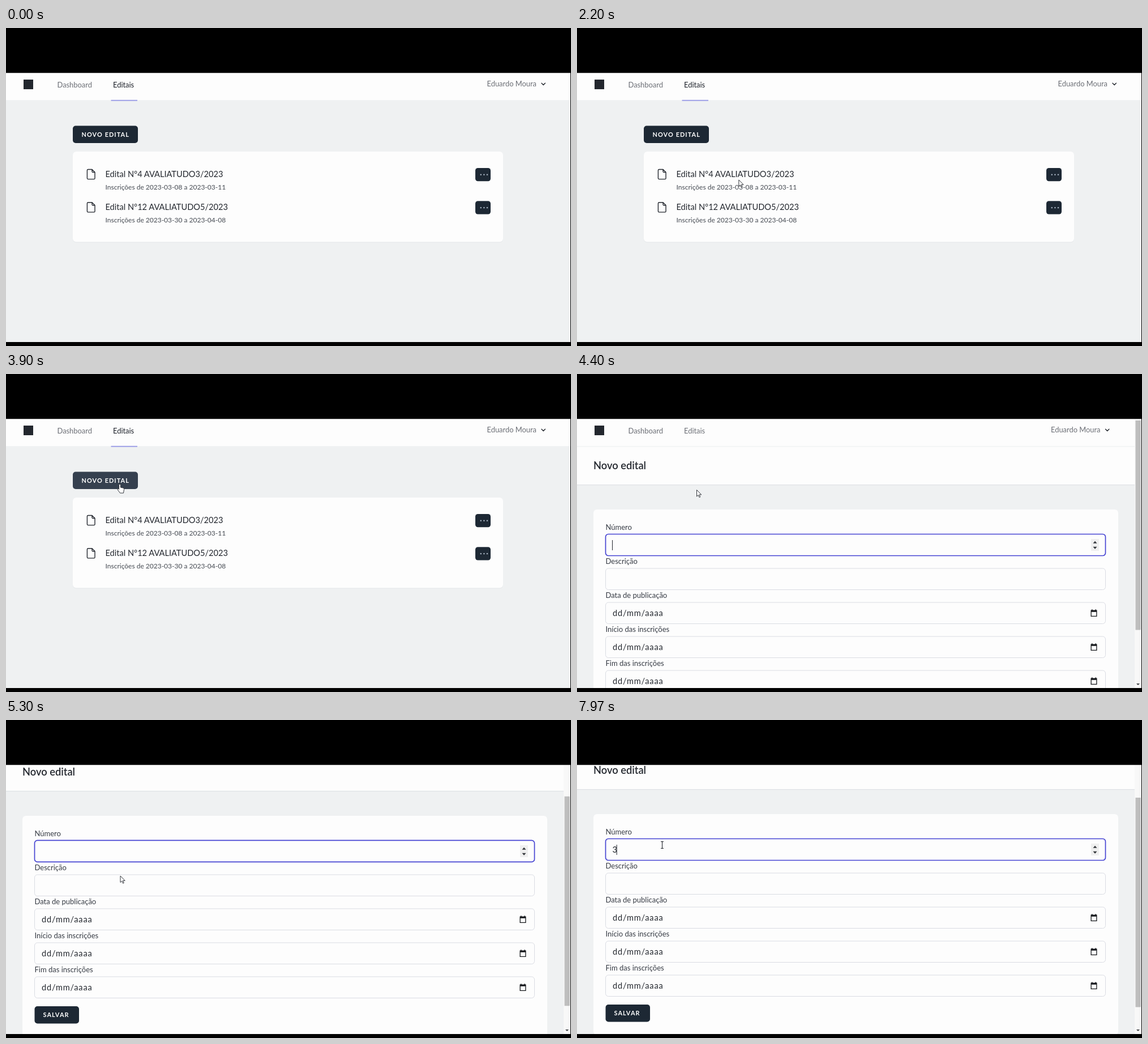
Write an HTML page that moves like this. It is 998x561 px and loops after 8 s.

```html
<!DOCTYPE html>
<html lang="pt-BR">
<head>
<meta charset="utf-8">
<title>Editais</title>
<style>
  html, body { margin: 0; width: 100%; height: 100%; overflow: hidden; background: #000; }
  svg { display: block; width: 100vw; height: 100vh; }
  text { font-family: Lato, "Open Sans", sans-serif; fill: #23272e; white-space: pre; }
  .nav { font-size: 12.9px; fill: #6c6f76; }
  .on { fill: #1c2029; }
  .title { font-size: 14.6px; }
  .sub { font-size: 12px; fill: #454a52; }
  .label { font-size: 13px; fill: #363b44; }
  .date { font-size: 14.5px; letter-spacing: .85px; }
  .value { font-size: 14.5px; }
  .head { font-size: 18.3px; font-weight: 600; }
  .btn { font-size: 10.9px; font-weight: 700; letter-spacing: 1.09px; fill: #fff; }
  .line { fill: none; stroke: #23272e; stroke-width: 1.4; stroke-linejoin: round; stroke-linecap: round; }
  .pointer { fill: #fff; stroke: #33363c; stroke-width: 1; stroke-linejoin: round; }
</style>
</head>
<body>
<svg id="stage" viewBox="0 0 998 561" preserveAspectRatio="none"></svg>
<script>
const LOOP = 8000;
const LOAD = 4300;
const BLINK_START = 4320;
const BLINK = 530;
const TYPED = 7770;
const DARK = '#1d2834';
const PAPER = '#fdfdfd';

const rect = (x, y, w, h, fill, r = 0, more = '') =>
  `<rect x="${x}" y="${y}" width="${w}" height="${h}" rx="${r}" fill="${fill}" ${more}/>`;
const text = (x, y, cls, str) => `<text x="${x}" y="${y}" class="${cls}">${str}</text>`;
const group = (id, body) => `<g id="${id}">${body}</g>`;

function card(x, y, w, h) {
  return rect(x, y + 1, w, h, '#e3e6e9', 6) + rect(x, y, w, h, PAPER, 6);
}

function navBar(right, active) {
  return rect(0, 70, right, 57.5, PAPER) +
    rect(0, 127.5, right, 1, '#f0f1f3') +
    rect(31, 91, 17, 17, '#23272e') +
    text(90.5, 104.5, 'nav', 'Dashboard') +
    text(189, 104.5, active ? 'nav on' : 'nav', 'Editais') +
    (active ? rect(185.5, 126.8, 46.5, 1.9, '#9a9ce6') : '');
}

function account(dx) {
  return `<g transform="translate(${dx} 0)">` +
    text(849.5, 103.2, 'nav', 'Eduardo Moura') +
    '<path class="line" d="M946 97.3l3.2 3.2 3.2-3.2"/></g>';
}

function listRow(y, title, period) {
  const dots = [838.8, 844.4, 850].map(x => `<circle cx="${x}" cy="${y + 11.7}" r="1.3" fill="#a3afbd"/>`);
  return `<path class="line" d="M145 ${y + 2.5}h7l5 5v10.5q0 1.6-1.6 1.6h-10.4q-1.6 0-1.6-1.6v-13.900q0-1.600 1.600-1.600zM152 ${y + 2.5}v3.400q0 1.600 1.600 1.600h3.400"/>` +
    text(175.5, y + 16, 'title', title) +
    text(175.5, y + 38, 'sub', period) +
    rect(829, y, 27, 23.3, DARK, 4.5) + dots.join('');
}

function listPage() {
  return rect(0, 79, 997, 476, '#eff1f2') +
    navBar(997, true) + account(0) +
    rect(118, 172.5, 115, 30.5, DARK, 5, 'id="newBtn"') +
    text(133.5, 191.6, 'btn', 'NOVO EDITAL') +
    card(118, 218, 760, 159.5) +
    listRow(247, 'Edital N°4 AVALIATUDO3/2023', 'Inscrições de 2023-03-08 a 2023-03-11') +
    listRow(305.3, 'Edital N°12 AVALIATUDO5/2023', 'Inscrições de 2023-03-30 a 2023-04-08');
}

function numberField() {
  return rect(50.5, 282.5, 883, 38, PAPER, 5, 'stroke="#4543d2" stroke-width="1.7"') +
    rect(908, 291, 14, 21, '#efefef') +
    '<path fill="#33363b" d="M911.500 298.700h7l-3.500-4zM911.500 304.700h7l-3.500 4z"/>';
}

function plainField(y) {
  return rect(50.5, y, 883, 37.5, PAPER, 5, 'stroke="#dadce3"');
}

function dateField(y) {
  return plainField(y) + text(63, y + 24, 'date', 'dd/mm/aaaa') +
    `<path fill="#16181c" fill-rule="evenodd" d="M907.500 ${y + 13.5}h1.500v-1.300h1.500v1.300h5v-1.300h1.500v1.300h1.500v11.500h-11zM908.800 ${y + 16.8}v7h8.400v-7z"/>`;
}

function formPage() {
  const labels = ['Número', 'Descrição', 'Data de publicação', 'Início das inscrições', 'Fim das inscrições'];
  const fields = labels.map((label, i) => {
    const y = 283 + 60 * i;
    const field = i === 0 ? numberField() : i === 1 ? plainField(y) : dateField(y);
    return text(50.5, y - 8, 'label', label) + field;
  });
  const content = navBar(985, false) + account(-12.5) +
    rect(0, 128.5, 985, 66.5, PAPER) + rect(0, 195, 985, 1.2, '#dfe2e5') +
    text(29, 168, 'head', 'Novo edital') +
    card(29, 239, 927, 390) + fields.join('') +
    rect(50.5, 575, 78.5, 30.5, DARK, 5) + text(65.5, 594.2, 'btn', 'SALVAR') +
    `<g id="digit">${text(62.5, 307, 'value', '3')}</g>` +
    rect(62, 293, 1, 18, '#23272e', 0, 'id="caret"');
  return rect(0, 79, 997, 476, '#eff1f2') + group('content', content) +
    rect(985, 79, 12, 476, '#f8f8f8') +
    rect(986.5, 82, 9.5, 369.5, '#bebebe', 0, 'id="thumb"') +
    '<path fill="#3c3e42" d="M988 546h6l-3 3z"/>';
}

function pointers() {
  return group('arrow', '<path class="pointer" d="M.500 .500v11.500l2.700-2.400 1.900 4.100 1.700-.8-1.900-4h3.800z"/>') +
    group('hand', '<path class="pointer" d="M-1.500 1.200Q0-.8 1.300 1.200V6l4.700 1q1.800.3 1.500 2.500l-1 6.500H.5L-4 9.800Q-4.200 8-2.500 8.500l1 1z"/>') +
    group('beam', '<path class="line" style="stroke-width:1.100" d="M-2-6h1.500l.5.500.5-.5H2M0-5.500v11M-2 6h1.500l.5-.5.5.5H2"/>');
}

document.getElementById('stage').innerHTML =
  '<clipPath id="view"><rect y="79.5" width="997" height="474.5"/></clipPath>' +
  rect(0, 0, 998, 561, '#000') +
  `<g clip-path="url(#view)">${group('list', listPage())}${group('form', formPage())}${group('cursor', pointers())}</g>`;

const el = {};
for (const node of document.querySelectorAll('[id]')) el[node.id] = node;

// Cursor stops: time, x, y
const PATH = [
  [1250, 484, 383], [1690, 387, 347], [2500, 240, 232], [2750, 201, 194],
  [4200, 201, 194], [4380, 211, 204], [4650, 211, 204], [5000, 201.5, 274.5],
  [5500, 201.5, 274.5], [6050, 150.5, 220.5]
];

const clamp = v => Math.min(1, Math.max(0, v));
const smooth = v => v * v * (3 - 2 * v);

function cursorAt(t) {
  let [, x, y] = PATH[0];
  for (let i = 1; i < PATH.length; i++) {
    const [t0, x0, y0] = PATH[i - 1];
    const [t1, x1, y1] = PATH[i];
    if (t < t0) break;
    const k = smooth(clamp((t - t0) / (t1 - t0)));
    x = x0 + (x1 - x0) * k;
    y = y0 + (y1 - y0) * k;
  }
  return { x, y };
}

function pointerShape(t, { x, y }, scroll) {
  if (t < LOAD) return x > 118 && x < 233 && y > 172 && y < 203 ? 'hand' : 'arrow';
  if (t < 5400) return 'arrow';
  const row = (y + scroll - 283) % 60;
  return row >= 0 && row < 38 ? 'beam' : 'arrow';
}

const show = (node, on) => node.setAttribute('display', on ? 'inline' : 'none');
const move = (node, x, y) => node.setAttribute('transform', `translate(${x} ${y})`);

function hoverFill(t) {
  const k = clamp((t - 2690) / 150);
  const mix = (a, b) => Math.round(a + (b - a) * k);
  return `rgb(${mix(29, 53)},${mix(40, 64)},${mix(52, 79)})`;
}

function draw(t) {
  const scroll = 73 * smooth(clamp((t - 5090) / 240));
  const typed = t >= TYPED;
  show(el.list, t < LOAD);
  show(el.form, t >= LOAD);
  el.newBtn.setAttribute('fill', hoverFill(t));
  move(el.content, 0, -scroll);
  move(el.thumb, 0, scroll * 55 / 73);
  show(el.digit, typed);
  show(el.caret, typed || t >= BLINK_START && Math.floor((t - BLINK_START) / BLINK) % 2 === 0);
  move(el.caret, typed ? 7.7 : 0, 0);

  const pos = cursorAt(t);
  const shape = pointerShape(t, pos, scroll);
  show(el.cursor, t >= PATH[0][0]);
  move(el.cursor, pos.x, pos.y);
  for (const name of ['arrow', 'hand', 'beam']) show(el[name], name === shape);
}

const start = performance.now();
function tick() {
  draw((performance.now() - start) % LOOP);
  requestAnimationFrame(tick);
}
tick();
</script>
</body>
</html>
```
